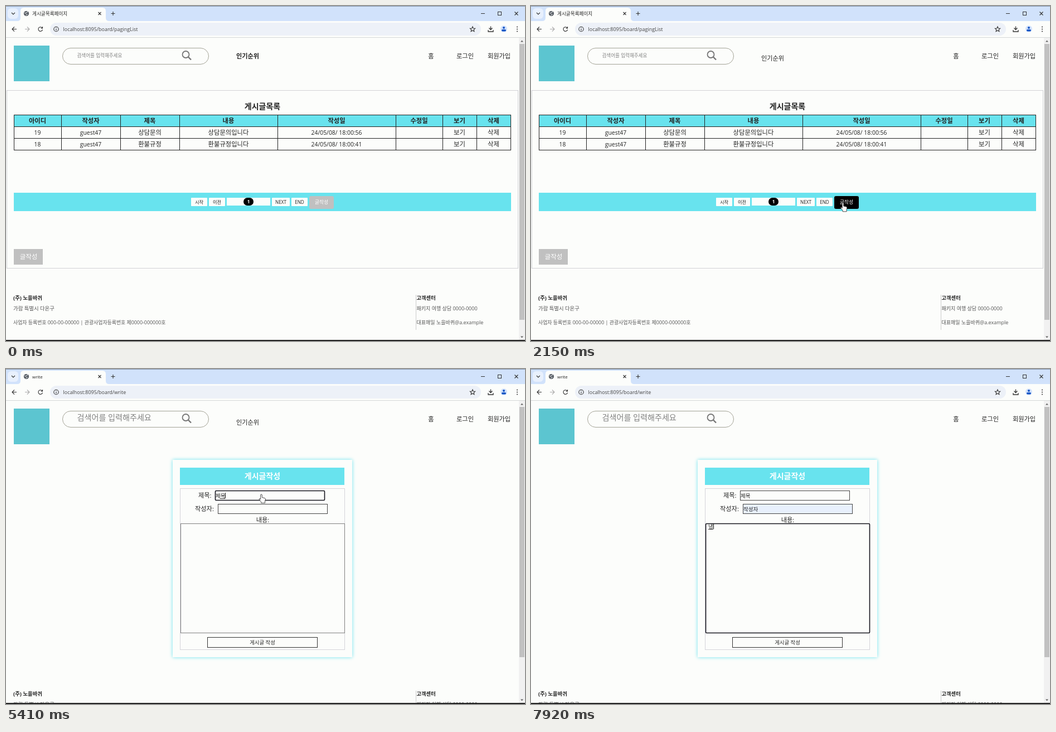
These frames come from a looping animation (931 by 601 pixels, 7.99 s). An HTML page:

```html
<!DOCTYPE html>
<html lang="ko">
<head>
<meta charset="utf-8">
<title>게시판</title>
<style>
html, body { margin: 0; width: 100%; height: 100%; overflow: hidden; background: #fcfdfb; }
svg { display: block; width: 100vw; height: 100vh; }
text { font-family: "Open Sans", "Noto Sans CJK KR", "Noto Sans CJK", sans-serif; white-space: pre; }
rect { shape-rendering: crispEdges; }
rect[rx] { shape-rendering: auto; }
#card { filter: drop-shadow(0 0 3px #68e3ee); }
</style>
</head>
<body>
<svg id="stage" viewBox="0 0 931 601"></svg>
<script>
const LOOP = 7990, LOAD = 2900;
const CYAN = '#68e3ee', PAPER = '#fcfdfb', GRAY = '#c0c0c0';

// y is the vertical middle of the text
const text = (x, y, s, size, o = {}) =>
  `<text x="${x}" y="${(y + size * .37).toFixed(2)}" font-size="${size}" fill="${o.fill || '#222'}"
    font-weight="${o.bold ? 700 : 400}" text-anchor="${o.mid ? 'middle' : 'start'}" ${o.attr || ''}>${s}</text>`;
const rect = (x, y, w, h, fill, attr = '') =>
  `<rect x="${x}" y="${y}" width="${w}" height="${h}" fill="${fill}" ${attr}/>`;
const frame = (x, y, w, h, color, attr = '') =>
  rect(x + .5, y + .5, w - 1, h - 1, 'none', `stroke="${color}" ${attr}`);
const line = (d, color = '#333', w = 1.1, attr = '') =>
  `<path d="${d}" fill="none" stroke="${color}" stroke-width="${w}" ${attr}/>`;
const dot = (x, y, r, fill, attr = '') => `<circle cx="${x}" cy="${y}" r="${r}" fill="${fill}" ${attr}/>`;
const group = (id, body, attr = '') => `<g id="${id}" ${attr}>${body}</g>`;
const mid = { mid: 1 }, boldMid = { mid: 1, bold: 1 };

function browser() {
  return rect(0, 0, 931, 27, '#d1e2fb') + rect(0, 0, 931, 1, '#8595ad') + rect(0, 27, 931, 29, PAPER) +
    rect(3, 4, 19, 19, '#e8f0fd', 'rx="6"') + line('M10 12l3 3 3-3') +
    `<path d="M20 27Q26 27 26 21V9Q26 3 32 3H173Q179 3 179 9V21Q179 27 185 27Z" fill="${PAPER}"/>` +
    dot(36.5, 13.5, 4.6, '#555b62') + line('M33.5 12q2 2 3.5 0t2-2.500M36 17q0-2 3-2', '#e4e6e8', 1.2) +
    text(47, 13.5, '', 8.6, { attr: 'id="tab"' }) +
    line('M165.500 11l5 5m0-5l-5 5M188.500 13.500h7m-3.500-3.500v7') +
    line('M852 13.500h7M912.500 10.500l6 6m0-6l-6 6') + frame(882, 10, 7, 7, '#333') +
    line('M19 41.500h-8m4-4l-4 4 4 4') + line('M34 41.500h8m-4-4l4 4-4 4', '#aaa') +
    line('M65 39.500a3.800 3.800 0 1 0 .5 3M65.500 37v3h-3') +
    rect(79, 30, 773, 23, '#edf1f8', 'rx="11.5"') +
    dot(90, 41.5, 4.2, 'none', 'stroke="#333" stroke-width="1.1"') + line('M90 41v3M90 39v1') +
    text(102.5, 41.5, '', 8.95, { attr: 'id="url"', fill: '#444' }) +
    line('M837 37l1.300 3 3.300.3-2.500 2.200.8 3.200-2.900-1.700-2.900 1.700.8-3.200-2.500-2.200 3.300-.3z') +
    line('M869.500 36.500v6m-3-3l3 3 3-3M865 43v3h9v-3', '#333', 1.3) +
    dot(893, 41, 6, '#d3e3fd') + dot(893, 39, 2, '#1a57c4') + rect(889, 42, 8, 3.5, '#1a57c4', 'rx="1.7"') +
    [37.5, 41.5, 45.5].map(y => dot(917, y, 1, '#333')).join('') +
    rect(0, 56, 931, 1, '#d5d8d8');
}

function header() {
  return rect(14, 71, 64, 64, '#5cc5d0') +
    rect(101.5, 75.5, 262, 29, PAPER, 'rx="14.5" stroke="#a3a396"') +
    dot(322.5, 87, 6, 'none', 'stroke="#757575" stroke-width="1.8"') + line('M327 91.500l5 5', '#757575', 2.4) +
    text(127.5, 0, '검색어를 입력해주세요', 8.55, { attr: 'id="search"', fill: '#808080' }) +
    text(433.5, 90, '인기순위', 11.2, { mid: 1, attr: 'id="ticker"' }) +
    text(762.5, 89.5, '홈', 11.2, mid) + text(823.5, 89.5, '로그인', 11.2, mid) +
    text(884.5, 89.5, '회원가입', 11.2, mid);
}

function listPage() {
  const cols = [14, 99, 205, 311, 487, 699, 783, 844, 905];
  const rows = [
    ['아이디', '작성자', '제목', '내용', '작성일', '수정일', '보기', '삭제'],
    ['19', 'guest47', '상담문의', '상담문의입니다', '24/05/08/ 18:00:56', '', '보기', '삭제'],
    ['18', 'guest47', '환불규정', '환불규정입니다', '24/05/08/ 18:00:41', '', '보기', '삭제']];
  const latin = s => /^[\x00-\x7f]+$/.test(s);
  const cells = rows.map((row, r) => row.map((s, c) =>
    text((cols[c] + cols[c + 1]) / 2, 206 + 21 * r, s, latin(s) ? 10.4 : 11.3, { mid: 1, bold: !r })).join('')).join('');
  const grid = cols.map(x => rect(x, 195, 1, 64, '#222')).join('') +
    [195, 216, 237, 258].map(y => rect(14, y, 892, 1, '#222')).join('');
  const key = (x, w, s) => rect(x, 344, w, 15, PAPER, 'rx="1"') + text(x + w / 2, 352, s, 8.2, mid);
  return frame(1, 151, 918, 320, '#d2d2d6') + text(460, 179.5, '게시글목록', 14, boldMid) +
    rect(14, 195, 892, 22, CYAN) + grid + cells + rect(14, 335, 892, 33, CYAN) +
    key(332, 29, '시작') + key(364, 29, '이전') + rect(396, 344, 78, 14, PAPER) +
    rect(426, 344, 18, 14, '#000', 'rx="7"') + text(435, 350.5, '1', 8.2, { mid: 1, bold: 1, fill: '#fff' }) +
    key(477, 32, 'NEXT') + key(512, 29, 'END') +
    rect(544, 341, 44, 23, GRAY, 'id="write" rx="3"') + text(566, 352, '글작성', 8.7, { mid: 1, fill: '#fff' }) +
    rect(14, 436, 52, 28, GRAY) + text(40.5, 450, '글작성', 11.5, { mid: 1, fill: '#fff' });
}

// x, y, width, height, border
const fields = [[375, 218, 197, 18, '#444'], [380, 242, 197, 18, '#444'], [313, 277, 295, 197, '#808080']];

function formPage() {
  return rect(299, 163, 322, 354, PAPER, 'id="card"') + rect(312, 177, 295, 31, CYAN) +
    text(460, 192, '게시글작성', 14, { mid: 1, bold: 1, fill: '#fff' }) +
    frame(312, 214, 296, 290, '#d4d4da') +
    text(345, 226.5, '제목:', 11.2) + text(339, 250.5, '작성자:', 11.2) + text(460.5, 270.5, '내용:', 11.2, mid) +
    fields.map(([x, y, w, h], i) => group('field' + i, rect(x + .5, y + .5, w - 1, h - 1, PAPER, 'rx="0"') +
      text(i < 2 ? x + 1 : 318, i < 2 ? y + 9 : 282, '', 9.5))).join('') +
    frame(361, 481, 198, 19, '#333') + text(460, 490.5, '게시글 작성', 9.4, mid) +
    rect(0, 0, 1, 10, '#111', 'id="caret"') + rect(0, 0, 9, 1, '#333', 'id="compose"');
}

function footer() {
  const soft = { fill: '#555' }, bold = { bold: 1 };
  return text(13, 524, '(주) 노을바퀴', 9.4, bold) + text(13, 543, '가람 특별시 다온구', 9.4, soft) +
    text(13, 568, '사업자 등록번호 000-00-00000 | 관광사업자등록번호 제0000-000000호', 8.9, soft) +
    rect(735, 518, 1, 63, '#ccc') + text(736.5, 524, '고객센터', 9.3, bold) +
    text(736.5, 543, '패키지 여행 상담 0000-0000', 9, soft) +
    text(736.5, 568, '대표매일 노을바퀴@a.example', 9, soft);
}

const scrollbar = () => rect(920, 57, 11, 543, '#f1f1f1') + rect(921, 68, 9, 495, '#c1c1c1', 'id="thumb"') +
  '<path d="M923 64.500h5l-2.500-3zM923 592.500h5l-2.500 3z" fill="#666"/>';

const pointer = `<path id="arrow" d="M0 0V11L2.600 8.700 4.300 12.500 6 11.800 4.300 8H7.500Z"/>
  <path id="hand" d="M-1.300 1C-1.300-.5 1.300-.5 1.300 1V5.500L6 6.600Q7.600 7 7.400 9L6.600 12V15.300H-.4V13.300L-3.800 9Q-4.200 7.200-2.600 7.600L-1.300 9Z"/>`;

const $ = id => document.getElementById(id);
const set = (el, attrs) => { for (const k in attrs) el.setAttribute(k, attrs[k]); };
const show = (el, on) => set(el, { visibility: on ? 'inherit' : 'hidden' });

$('stage').innerHTML = rect(0, 0, 931, 601, PAPER) + header() + group('list', listPage()) +
  group('form', formPage()) + group('footer', footer()) + scrollbar() + browser() +
  rect(0, 599, 931, 2, '#222') + group('pointer', pointer, 'fill="#fff" stroke="#222" stroke-width=".8"');

// start time, offset from, offset to; each slide lasts 800 ms
const slides = [[0, 0, 0], [710, 0, -20], [1510, 20, 0], [LOAD, 0, 0], [4030, 0, -20], [4840, 20, 0], [6600, 0, -20]];

// time, field, value, still composing the last syllable
const typing = [
  [3740, 0, ''], [4300, 0, 'ㅈ', 1], [4450, 0, '제', 1], [4900, 0, '젬', 1], [5050, 0, '제모', 1], [5200, 0, '제목', 1],
  [5700, 1, ''], [5850, 1, 'ㅈ', 1], [5960, 1, '자', 1], [6080, 1, '작', 1],
  [6280, 1, '작ㅅ', 1], [6360, 1, '작서', 1], [6430, 1, '작성', 1], [6640, 1, '작성자'],
  [7100, 2, ''], [7620, 2, 'ㄴ', 1], [7740, 2, '내', 1], [7910, 2, '냉', 1]];

// time, x, y
const paths = [
  [[300, 245, 605], [690, 319, 412], [1300, 559.5, 353.5], [LOAD, 559.5, 353.5]],
  [[3430, 540, 345], [3720, 458, 225], [5690, 458, 225]]];

const last = (steps, t) => steps.filter(s => s[0] <= t).pop();

function drawPointer(t) {
  const path = paths.find(p => t >= p[0][0] && t < p[p.length - 1][0]);
  show($('pointer'), path);
  if (!path) return;
  const i = path.findIndex(p => p[0] > t), [t0, x0, y0] = path[i - 1], [t1, x1, y1] = path[i];
  const k = (t - t0) / (t1 - t0), x = x0 + (x1 - x0) * k, y = y0 + (y1 - y0) * k;
  const inside = (a, b, w, h) => x > a && x < a + w && y > b && y < b + h;
  const onWrite = t < LOAD && inside(544, 341, 44, 23);
  const hand = onWrite || t > LOAD && inside(...fields[0]);
  set($('pointer'), { transform: `translate(${x} ${y})` });
  set($('write'), { fill: onWrite ? '#000' : GRAY });
  show($('hand'), hand);
  show($('arrow'), !hand);
}

function drawForm(t) {
  const now = last(typing, t);
  fields.forEach((f, i) => {
    const [box, label] = $('field' + i).children;
    const entry = last(typing.filter(s => s[1] === i), t), focus = now && now[1] === i;
    label.textContent = entry ? entry[2] : '';
    set(box, {
      stroke: focus ? '#16161f' : f[4], 'stroke-width': focus ? 1.6 : 1, rx: focus ? 1.5 : 0,
      fill: i === 1 && t >= 6640 ? '#e8f0fc' : PAPER
    });
  });
  show($('caret'), now);
  show($('compose'), now && now[3]);
  if (!now) return;
  const [x, y] = fields[now[1]], left = now[1] < 2 ? x + 1 : 318, top = now[1] < 2 ? y + 4 : 277;
  const end = left + now[2].length * 8.74;
  set($('caret'), { x: Math.round(end), y: top });
  set($('compose'), { x: Math.round(end - 9), y: top + 10 });
}

function draw(t) {
  const first = t < LOAD;
  show($('list'), first);
  show($('form'), !first);
  $('tab').textContent = first ? '게시글목록페이지' : 'write';
  set($('tab'), { 'font-size': first ? 8.6 : 8 });
  $('url').textContent = 'localhost:8095/board/' + (first ? 'pagingList' : 'write');
  set($('search'), { 'font-size': first ? 8.55 : 14.1, y: first ? 92.2 : 92.4 });
  set($('footer'), { transform: `translate(0 ${first ? 0 : 59})` });
  set($('thumb'), { height: first ? 495 : 449 });

  const [start, from, to] = last(slides, t);
  const shift = from + (to - from) * Math.min(1, (t - start) / 800);
  set($('ticker'), { transform: `translate(0 ${shift})`, 'font-weight': shift ? 400 : 700 });
  show($('ticker'), t < 7450);

  drawForm(t);
  drawPointer(t);
}

function tick() {
  draw(performance.now() % LOOP);
  requestAnimationFrame(tick);
}
tick();
</script>
</body>
</html>
```
